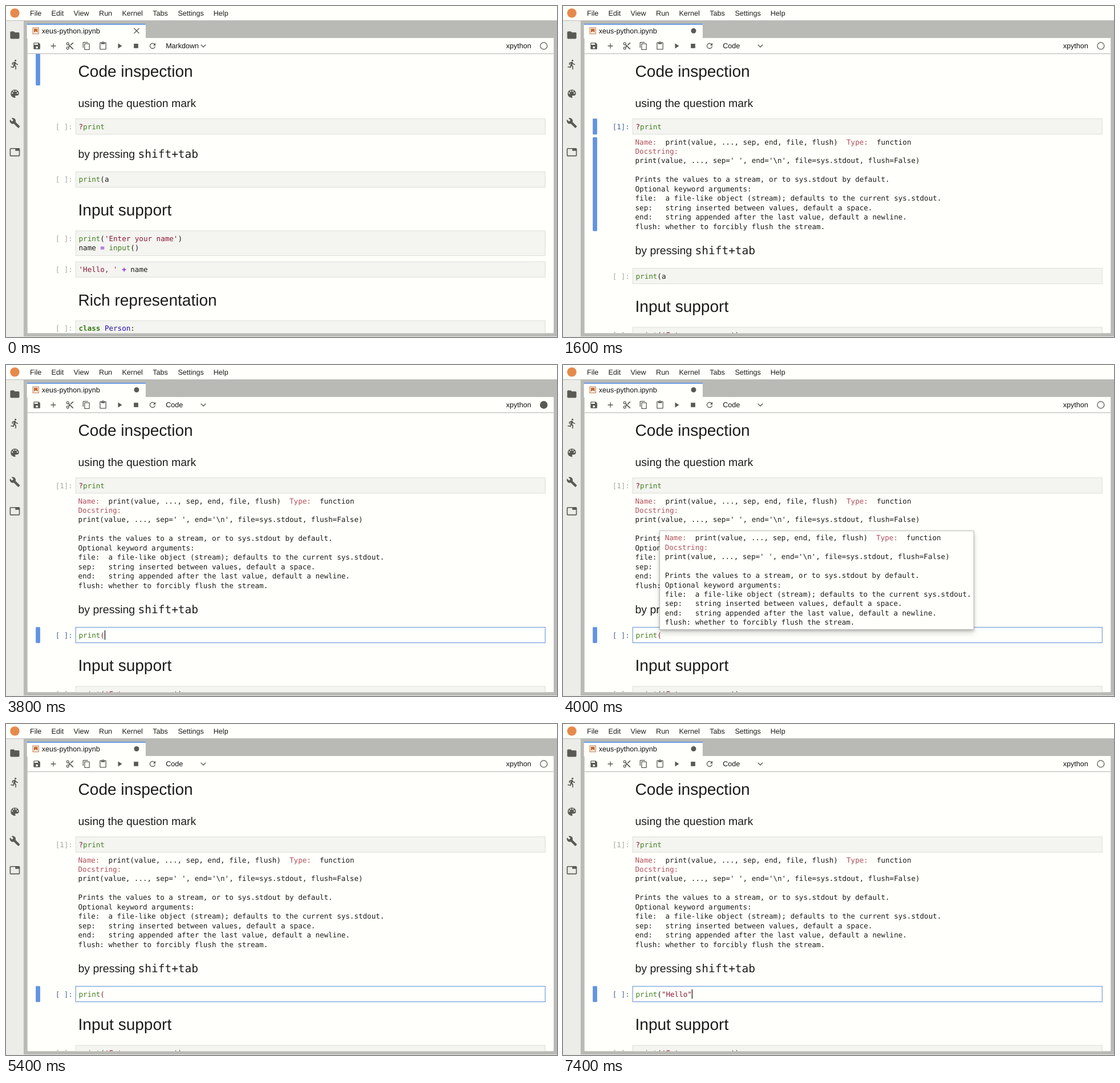
Write an HTML page that moves like this. It is 966 by 580 pixels and loops after 8000 ms.

```html
<!DOCTYPE html>
<html lang="en">
<head>
<meta charset="utf-8">
<title>Notebook: code inspection</title>
<style>
  html, body { margin: 0; width: 100%; height: 100%; overflow: hidden; background: #fffffb; }
  svg { display: block; width: 966px; height: 580px; }
  text { white-space: pre; text-rendering: geometricPrecision; fill: #1c1c1a; }
  .ui { font: 13px "Liberation Sans", Arial, sans-serif; fill: #111; }
  .mono { font: 13px "DejaVu Sans Mono", monospace; }
  .h1 { font: 29.03px "Liberation Sans", Arial, sans-serif; }
  .h2 { font: 20.16px "Liberation Sans", Arial, sans-serif; }
  .h2 tspan { font-family: "DejaVu Sans Mono", monospace; }
  .prompt { fill: #a6a6a1; text-anchor: end; }
  .live { fill: #41659c; }
  .cell { fill: #f4f4f1; stroke: #dcdcd8; }
  .edit { fill: #fffffb; stroke: #5b8ddb; }
  .bar { fill: #6293e2; }
  .icon { fill: #5a5a55; }
  .line { fill: none; stroke: #5a5a55; }
  .fn { fill: #43801f; }
  .key { fill: #377a14; font-weight: bold; }
  .str { fill: #8a1a32; }
  .op { fill: #7f2bcb; font-weight: bold; }
  .def { fill: #2014a8; }
  .label { fill: #b0505c; }
  .tip { fill: #fffffb; stroke: #b9b9b5;
    filter: drop-shadow(0 2px 2px rgba(0,0,0,.2)) drop-shadow(0 6px 5px rgba(0,0,0,.14)); }
</style>
</head>
<body>
<svg viewBox="0 0 1000 600" preserveAspectRatio="none">
  <defs>
    <clipPath id="page"><rect x="39" y="87" width="955" height="506"/></clipPath>
    <g id="doc" class="mono">
      <text><tspan class="label">Name:</tspan>  print(value, ..., sep, end, file, flush)  <tspan class="label">Type:</tspan>  function</text>
      <text y="17" class="label" style="fill:#b0505c">Docstring:</text>
      <text y="34">print(value, ..., sep=' ', end='\n', file=sys.stdout, flush=False)</text>
      <text y="68">Prints the values to a stream, or to sys.stdout by default.</text>
      <text y="85">Optional keyword arguments:</text>
      <text y="102">file:  a file-like object (stream); defaults to the current sys.stdout.</text>
      <text y="119">sep:   string inserted between values, default a space.</text>
      <text y="136">end:   string appended after the last value, default a newline.</text>
      <text y="153">flush: whether to forcibly flush the stream.</text>
    </g>
  </defs>

  <!-- window frame -->
  <rect width="1000" height="600" fill="#b9bab5"/>
  <rect width="1000" height="26" fill="#fffffb"/>
  <rect y="27" width="32" height="573" fill="#ecece8"/>
  <rect y="599" width="1000" height="1" fill="#e9e9e5"/>
  <rect x="38" y="32" width="215.5" height="27" fill="#fffffb"/>
  <rect x="38" y="32" width="215.5" height="2" class="bar"/>
  <rect x="39" y="58" width="955" height="535" fill="#fffffb"/>
  <rect x="39" y="86" width="955" height="1" fill="#b0b0ac"/>

  <!-- menu -->
  <circle cx="16" cy="12.8" r="8.5" fill="#e68a4c"/>
  <g class="ui">
    <text x="43.5" y="17.3">File</text>
    <text x="82.4" y="17.3">Edit</text>
    <text x="122.8" y="17.3">View</text>
    <text x="168.8" y="17.3">Run</text>
    <text x="210.6" y="17.3">Kernel</text>
    <text x="266.2" y="17.3">Tabs</text>
    <text x="312" y="17.3">Settings</text>
    <text x="376.6" y="17.3">Help</text>
  </g>

  <!-- sidebar -->
  <g class="icon" fill-rule="evenodd">
    <path transform="translate(6 42.8) scale(.8333)" d="M10 4H4c-1.1 0-2 .9-2 2v12c0 1.1.9 2 2 2h16c1.1 0 2-.9 2-2V8c0-1.1-.9-2-2-2h-8z"/>
    <path transform="translate(6 96) scale(.8333)" d="M13.5 5.5a2 2 0 1 0 0-4 2 2 0 0 0 0 4zM9.9 19.4l1-4.4 2.1 2v6h2v-7.5l-2.1-2 .6-3c1.3 1.5 3.3 2.5 5.5 2.5v-2c-1.9 0-3.5-1-4.3-2.4l-1-1.6c-.4-.6-1-1-1.7-1-.3 0-.5.1-.8.1L6 8.3V13h2V9.6l1.8-.7L8.2 17l-4.9-1-.4 2z"/>
    <path transform="translate(6 149) scale(.8333)" d="M12 3a9 9 0 0 0 0 18c.8 0 1.5-.7 1.5-1.5 0-1-.8-1.200-.8-2 0-.8.7-1.500 1.500-1.500H16a5 5 0 0 0 5-5c0-4.400-4-8-9-8zM5 10.500a1.500 1.500 0 1 0 3 0 1.500 1.500 0 1 0-3 0zM8 6.500a1.500 1.500 0 1 0 3 0 1.500 1.500 0 1 0-3 0zM13 6.500a1.500 1.500 0 1 0 3 0 1.500 1.500 0 1 0-3 0zM16 10.500a1.500 1.500 0 1 0 3 0 1.500 1.500 0 1 0-3 0z"/>
    <path transform="translate(6 202) scale(.8333)" d="M22.700 19l-9.100-9.100c.9-2.300.4-5-1.500-6.900-2-2-5-2.400-7.400-1.300L9 6 6 9 1.600 4.700C.4 7.100.9 10.100 2.900 12.100c1.900 1.900 4.600 2.400 6.900 1.500l9.100 9.100c.4.4 1 .4 1.400 0l2.300-2.300c.5-.4.5-1.100.1-1.400z"/>
    <path transform="translate(6 255) scale(.8333)" d="M21 3H3c-1.100 0-2 .9-2 2v14c0 1.100.9 2 2 2h18c1.100 0 2-.9 2-2V5c0-1.100-.9-2-2-2zm0 16H3V5h10v4h8z"/>
  </g>

  <!-- tab -->
  <g transform="translate(47 38) scale(.636)" fill="#c06a34">
    <path d="M1.800 1.800h18.400v18.400H1.800zM3.300 3.300v15.400h15.400V3.300z" fill-rule="evenodd"/>
    <path d="M16.500 16.500l-5.400-4.300-5.600 4.300v-11h11z"/>
  </g>
  <text class="ui" x="65" y="49.300">xeus-python.ipynb</text>
  <path data-on="0-1400" class="line" stroke-width="1.300" d="M232.300 40.300l9.400 9.400m0-9.400l-9.400 9.400"/>
  <circle data-on="1400-8000" class="icon" cx="237" cy="45" r="4.600"/>

  <!-- toolbar -->
  <g class="icon" fill-rule="evenodd" transform="translate(0 64.400)">
    <path transform="translate(48) scale(.667)" d="M17 3H5c-1.100 0-2 .9-2 2v14c0 1.100.9 2 2 2h14c1.100 0 2-.9 2-2V7zM12 19a3 3 0 1 1 0-6 3 3 0 0 1 0 6zM15 9H5V5h10z"/>
    <path transform="translate(78) scale(.667)" d="M19 13h-6v6h-2v-6H5v-2h6V5h2v6h6z"/>
    <g transform="translate(108) scale(.667)">
      <circle class="line" cx="6" cy="6" r="3" stroke-width="2"/>
      <circle class="line" cx="6" cy="18" r="3" stroke-width="2"/>
      <path d="M9.600 7.600L22 20v1h-3l-7-7-2.400 2.400-2-2L10 12 7.600 9.600zM19 3l-6 6 2 2 7-7V3z"/>
    </g>
    <path transform="translate(138) scale(.667)" d="M16 1H4c-1.100 0-2 .9-2 2v14h2V3h12zM19 5H8c-1.100 0-2 .9-2 2v14c0 1.100.9 2 2 2h11c1.100 0 2-.9 2-2V7c0-1.100-.9-2-2-2zm0 16H8V7h11z"/>
    <path transform="translate(168) scale(.667)" d="M19 2h-4.200a3 3 0 0 0-5.600 0H5c-1.100 0-2 .9-2 2v16c0 1.100.9 2 2 2h14c1.100 0 2-.9 2-2V4c0-1.100-.9-2-2-2zM12 2a1 1 0 1 1 0 2 1 1 0 0 1 0-2zM19 20H5V4h2v3h10V4h2z"/>
    <path transform="translate(198) scale(.667)" d="M8 5v14l11-7z"/>
    <path transform="translate(228) scale(.667)" d="M6 6h12v12H6z"/>
    <path transform="translate(258) scale(.889)" d="M9 13.500a4.500 4.500 0 1 1 3.170-7.670L10 8h5V3l-1.760 1.760A6 6 0 1 0 14.900 10h-1.520A4.500 4.500 0 0 1 9 13.500z"/>
  </g>
  <text class="ui" x="290" y="77" data-on="0-1400 2200-2400">Markdown</text>
  <text class="ui" x="290" y="77" data-on="1400-2200 2400-8000">Code</text>
  <path class="line" stroke-width="1.400" d="M353.700 70l4.400 4.400 4.400-4.400"/>
  <text class="ui" x="907.500" y="77">xpython</text>
  <circle class="line" cx="976" cy="72.300" r="6.200" stroke-width="1.300"/>
  <circle data-on="3800-4000" class="icon" cx="976" cy="72.300" r="6.800"/>

  <!-- notebook -->
  <g clip-path="url(#page)">
    <text class="h1" x="131" y="128">Code inspection</text>
    <text class="h2" x="131" y="183">using the question mark</text>

    <g class="mono">
      <text class="prompt" x="121" y="223" data-on="0-1400">[ ]:</text>
      <text class="prompt live" x="121" y="223" data-on="1400-1600">[*]:</text>
      <text class="prompt live" x="121" y="223" data-on="1600-2200">[1]:</text>
      <text class="prompt" x="121" y="223" data-on="2200-8000">[1]:</text>
      <rect class="cell" x="126.500" y="204.500" width="852" height="28"/>
      <text x="132" y="223"><tspan class="str">?</tspan><tspan class="fn">print</tspan></text>
    </g>
    <use href="#doc" x="131" y="251" data-on="1600-8000"/>

    <g id="rest">
      <text class="h2" x="131" y="275">by pressing <tspan>shift+tab</tspan></text>
      <g class="mono">
        <text class="prompt" x="121" y="319" data-on="0-2400">[ ]:</text>
        <text class="prompt live" x="121" y="319" data-on="2400-8000">[ ]:</text>
        <rect class="cell" x="126.500" y="300.500" width="852" height="28"/>
        <rect class="edit" x="126.500" y="300.500" width="852" height="28" data-on="3000-8000"/>
        <text x="132" y="319"><tspan class="fn">print</tspan><tspan id="paren">(</tspan><tspan id="arg"></tspan></text>
        <rect id="caret" y="306" width="1.200" height="17" fill="#000"/>
      </g>

      <text class="h1" x="131" y="380">Input support</text>
      <g class="mono">
        <text class="prompt" x="121" y="426">[ ]:</text>
        <rect class="cell" x="126.500" y="407.500" width="852" height="45"/>
        <text x="132" y="426"><tspan class="fn">print</tspan>(<tspan class="str">'Enter your name'</tspan>)</text>
        <text x="132" y="443">name <tspan class="op">=</tspan> <tspan class="fn">input</tspan>()</text>
        <text class="prompt" x="121" y="482">[ ]:</text>
        <rect class="cell" x="126.500" y="463.500" width="852" height="28"/>
        <text x="132" y="482"><tspan class="str">'Hello, '</tspan> <tspan class="op">+</tspan> name</text>
      </g>

      <text class="h1" x="131" y="543">Rich representation</text>
      <g class="mono">
        <text class="prompt" x="121" y="589">[ ]:</text>
        <rect class="cell" x="126.500" y="570.500" width="852" height="80"/>
        <text x="132" y="589"><tspan class="key">class</tspan> <tspan class="def">Person</tspan>:</text>
      </g>
    </g>

    <!-- selected cell -->
    <g class="bar">
      <rect x="54" y="80" width="8" height="64" rx="1.500" data-on="0-800"/>
      <rect x="54" y="154" width="8" height="40" rx="1.500" data-on="800-1400"/>
      <rect x="54" y="204" width="8" height="29" rx="1.500" data-on="1400-2200"/>
      <rect x="54" y="238" width="8" height="170" rx="1.500" data-on="1600-2200"/>
      <rect x="54" y="418" width="8" height="47" rx="1.500" data-on="2200-2400"/>
      <rect x="54" y="475" width="8" height="29" rx="1.500" data-on="2400-8000"/>
    </g>

    <g data-on="4000-5400">
      <rect class="tip" x="175.500" y="300.500" width="570" height="179"/>
      <use href="#doc" x="185" y="318"/>
    </g>
  </g>
</svg>
<script>
  const LOOP = 8000, CHAR = 13 * 1233 / 2048;
  const byId = id => document.getElementById(id);
  const rest = byId('rest'), paren = byId('paren'), arg = byId('arg'), caret = byId('caret');

  // start time, argument text, caret column (-1 hides it)
  const typing = [
    [0, 'a', -1], [3000, 'a', 7], [3200, '', 6], [4000, '', -1], [4400, '', 6],
    [4800, '', -1], [5600, '', 6], [5800, '""', 7], [6400, '"H"', 8],
    [7000, '"Hell"', 11], [7400, '"Hello"', 13]
  ];

  const timed = [...document.querySelectorAll('[data-on]')].map(el => ({
    el, spans: el.dataset.on.split(' ').map(s => s.split('-').map(Number))
  }));

  function draw(t) {
    for (const { el, spans } of timed)
      el.style.display = spans.some(([a, b]) => t >= a && t < b) ? '' : 'none';
    rest.setAttribute('transform', `translate(0 ${t < 1600 ? 0 : 175})`);

    const [, text, col] = typing.filter(s => s[0] <= t).pop();
    arg.textContent = text;
    arg.setAttribute('class', text[0] === '"' ? 'str' : '');
    paren.setAttribute('class', text ? '' : 'str');
    caret.style.display = col < 0 ? 'none' : '';
    caret.setAttribute('x', 132 + col * CHAR);
  }

  let start;
  function tick(now) {
    start ??= now;
    draw(Math.max(0, now - start) % LOOP);
    requestAnimationFrame(tick);
  }
  draw(0);
  requestAnimationFrame(tick);
</script>
</body>
</html>
```
